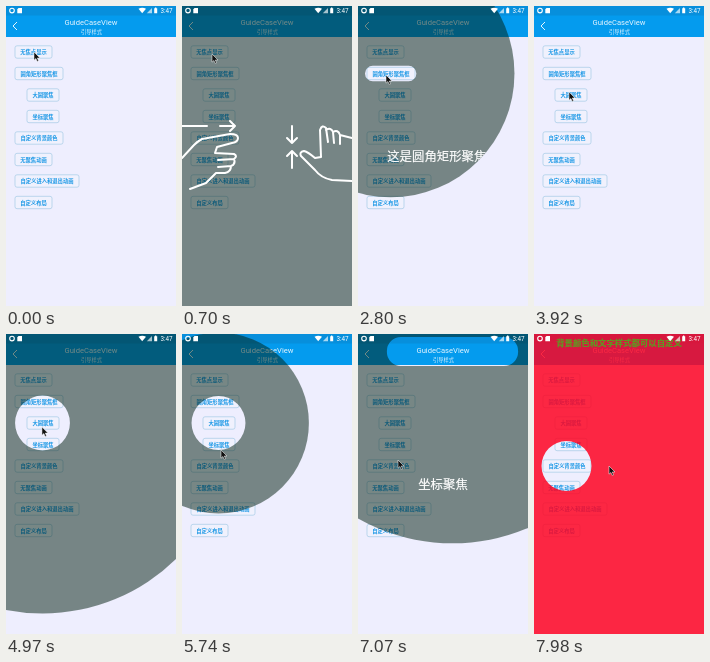
Recreate the animation shown at these times as an HTML page. Size 170 by 300 pixels, loop 8 s.

```html
<!DOCTYPE html>
<html lang="zh-CN">
<head>
<meta charset="utf-8">
<title>GuideCaseView</title>
<style>
  html, body { margin: 0; width: 100%; height: 100%; overflow: hidden; background: #eeeefe; }
  svg { display: block; width: 100%; height: 100%; }
  text { font-family: Roboto, "Noto Sans CJK SC", "Noto Sans CJK", sans-serif; text-anchor: middle; }
  .label { font-size: 5.3px; font-weight: 700; fill: #1a98e6; }
  .hand { fill: none; stroke: #fff; stroke-width: 2; stroke-linecap: round; stroke-linejoin: round; }
</style>
</head>
<body>
<svg viewBox="0 0 170 300" preserveAspectRatio="none">
  <defs><clipPath id="reveal"><circle id="lens"/></clipPath></defs>

  <rect width="170" height="300" fill="#eeeefe"/>
  <rect width="170" height="31" fill="#049bee"/>
  <rect width="170" height="9.5" fill="#078fdc"/>
  <path d="M11 16L7 20L11 24" fill="none" stroke="#fff" stroke-width=".9"/>
  <text x="85" y="19.4" font-size="7.6" fill="#e6f5ff">GuideCaseView</text>
  <text x="85.5" y="27.6" font-size="5.2" fill="#e6f5ff">引导样式</text>
  <g id="buttons"></g>

  <g id="overlay" clip-path="url(#reveal)">
    <path id="shade" fill-rule="evenodd"/>
    <g id="gestures" class="hand">
      <path d="M0 120H25M38 120H53M48 115L53 120L48 125"/>
      <path d="M0 152L12 139Q16 135 20 133L48 128Q56 128 56 132Q56 136 50 137L35 141L33 147L52 148Q56 150 52 153L36 154M52 153Q54 158 49 160L36 161M49 160Q49 166 43 167L34 167L24 177L8 183"/>
      <path d="M110 120V137M105 132L110 137L115 132M110 162V145M105 150L110 145L115 150"/>
      <path d="M170 175L150 174Q139 172 133 164L119 150Q117 146 122 145Q126 146 133 152L139 151L138 124Q140 118 144 122L146 136M144 124Q149 121 151 126L152 137M151 126Q156 123 158 129L158 138M158 129L170 132"/>
    </g>
    <text id="hint"></text>
  </g>

  <g fill="#fff">
    <circle cx="6" cy="4.6" r="2.3" fill="none" stroke="#fff" stroke-width="1.1"/>
    <path d="M12.5 2H16V7.3H11.3V3.3Z"/>
    <path d="M132.5 2.8Q136.2 .6 140 2.8L136.2 7.3Z"/>
    <path d="M146 2V7.3H140.8Z" opacity=".65"/>
    <path d="M148.2 2.3H149V1.6H150.3V2.3H151.2V7.3H148.2Z"/>
    <text x="160.5" y="7" font-size="6.3">3:47</text>
  </g>
  <path id="cursor" d="M0 0V8.2L1.9 6.5L3.2 9.4L4.6 8.8L3.3 6H6Z" fill="#111" stroke="#fff" stroke-width=".5"/>
</svg>

<script>
const LOOP = 8000, FADE = 400, REACH = Math.hypot(170, 300);
const $ = id => document.getElementById(id);
const GREY = "rgba(0,30,14,.5)";
const RED = "rgba(255,0,32,.84)";

const buttons = [
  ["无焦点显示", 9, 37], ["圆角矩形聚焦框", 9, 48], ["大圆聚焦", 21, 32], ["坐标聚焦", 21, 32],
  ["自定义背景颜色", 9, 48], ["无聚焦动画", 9, 37], ["自定义进入和退出动画", 9, 64], ["自定义布局", 9, 37]
];
$("buttons").innerHTML = buttons.map(([label, x, w], i) => {
  const y = 46 + i * 21.5;
  return `<rect x="${x}" y="${y - 6.2}" width="${w}" height="12.4" rx="2" fill="#f0f1fd" stroke="#a5cbe6" stroke-width=".7"/>
    <text class="label" x="${x + w / 2}" y="${y + 2}">${label}</text>`;
}).join("");

// hole: centre, half width, half height, corner radius
const guides = [
  { start: 350, exit: 1522, x: 85, y: 150, gestures: true },
  { start: 2530, exit: 3320, x: 32.7, y: 67.5, w: 24, h: 6.2, r: 6, hint: "这是圆角矩形聚焦框" },
  { start: 4650, exit: 5597, x: 36.5, y: 89, w: 25.5, h: 25.5, r: 25.5 },
  { start: 6420, exit: 7000, x: 94.5, y: 17.5, w: 65.5, h: 14.5, r: 14, hint: "坐标聚焦" },
  { start: 7560, exit: 9000, x: 32.5, y: 132, w: 23.5, h: 23.5, r: 23.5, color: RED,
    hint: "背景颜色和文字样式都可以自定义", size: 8.4, hintY: 12, ink: "#5f9a22", weight: 700 }
];

// time, x, y of the pointer tip
const path = [
  [0, 28, 46], [300, 28, 46], [700, 30, 48], [2050, 30, 48], [2400, 28, 69], [3350, 28, 69],
  [3800, 35, 86], [4750, 35, 86], [5450, 39, 116], [6450, 39, 116], [6900, 40, 126],
  [7600, 40, 126], [7950, 75, 132], [LOOP, 75, 132]
];

function pointer(t) {
  const i = path.findIndex(p => p[0] > t);
  const [t0, x0, y0] = path[i - 1], [t1, x1, y1] = path[i];
  const k = (t - t0) / (t1 - t0), e = k * k * (3 - 2 * k);
  return [x0 + (x1 - x0) * e, y0 + (y1 - y0) * e];
}

// cubic acceleration in, cubic deceleration out
function radius(g, t) {
  if (t >= g.exit) return REACH * (1 - (t - g.exit) / FADE) ** 3;
  const from = g.w || 0, k = Math.min(1, (t - g.start) / FADE);
  return from + (REACH - from) * k ** 3;
}

function hole(g, t) {
  if (!g.w) return "";
  const phase = (t - g.start) % 667 / 333.5;
  const grow = 2 * (phase < 1 ? phase : 2 - phase);
  const w = g.w + grow, h = g.h + grow, r = g.r + grow, a = 2 * (w - r), b = 2 * (h - r);
  const arc = (x, y) => `a${r} ${r} 0 0 1 ${x} ${y}`;
  return `M${g.x - w + r} ${g.y - h}h${a}${arc(r, r)}v${b}${arc(-r, r)}h${-a}${arc(-r, -r)}v${-b}${arc(r, -r)}Z`;
}

function set(el, attrs) {
  for (const key in attrs) el.setAttribute(key, attrs[key]);
}

function draw(t) {
  const g = guides.find(g => t >= g.start && t < g.exit + FADE);
  $("overlay").style.display = g ? "" : "none";
  if (g) {
    set($("lens"), { cx: g.x, cy: g.y, r: radius(g, t) });
    set($("shade"), { d: "M0 0H170V300H0Z" + hole(g, t), fill: g.color || GREY });
    $("gestures").style.display = g.gestures ? "" : "none";
    const ink = g.ink || "#fff";
    set($("hint"), {
      x: 85, y: g.hintY || 155, "font-size": g.size || 12.4, "font-weight": g.weight || 400,
      fill: ink, stroke: ink, "stroke-width": .2
    });
    $("hint").textContent = g.hint || "";
  }
  set($("cursor"), { transform: `translate(${pointer(t)})` });
}

const begin = performance.now();
function tick() {
  draw((performance.now() - begin) % LOOP);
  requestAnimationFrame(tick);
}
tick();
</script>
</body>
</html>
```
